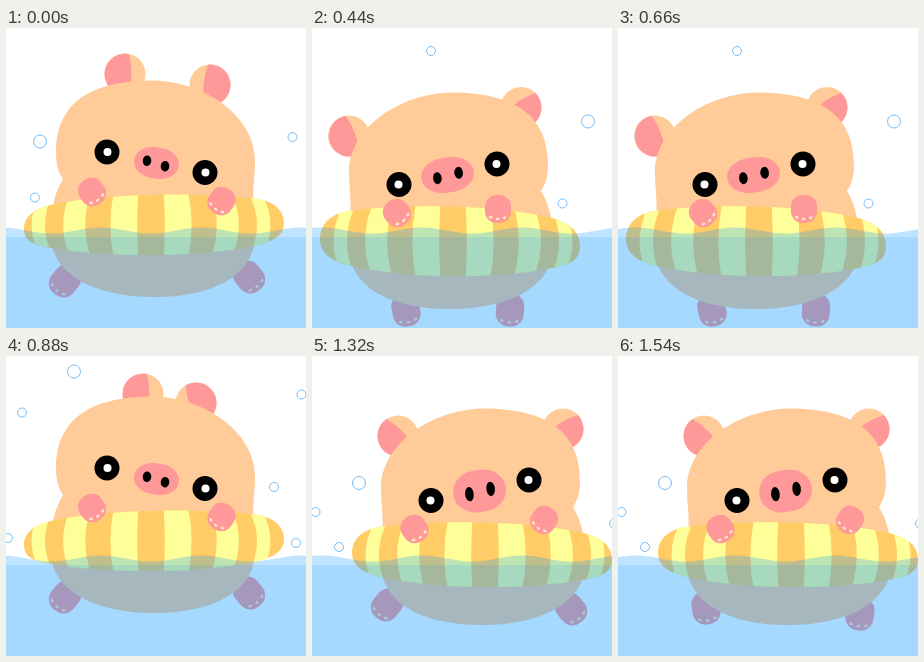
An HTML page with a canvas for the animation above (1.76 s loop, 300 px wide and 300 px high).

```html
<!DOCTYPE html>
<html lang="en">
<head>
<meta charset="utf-8">
<title>Floating pig</title>
<style>
html, body { margin: 0; width: 100%; height: 100%; overflow: hidden; background: #fff; }
canvas { display: block; width: 300px; height: 300px; }
</style>
</head>
<body>
<canvas id="stage" width="300" height="300"></canvas>
<script>
const ctx = document.getElementById('stage').getContext('2d');
const LOOP = 1760, SURFACE = 209;
const PEACH = '#ffcc99', PINK = '#ff9999', ORANGE = '#ffcc66', YELLOW = '#ffff99';

const BODY = new Path2D('M50 125C50 80 77 52.5 148 52.5C205 55 249 92 249 132C249 150 246 160 248 185' +
  'C261 246 209 269 148 269C89 269 39 246 45 198C45 179 50 162 57 151C52 144 50 135 50 125Z');
const RING = new Path2D('M18 201C18 186 32 178 60 174C110 165 200 164 252 171C270 174 278 184 278 195' +
  'C278 207 268 213 252 217C200 229 110 231 45 220C27 217 18 213 18 201Z');

// Limbs come in pairs: lean lowers one side, tilt opens both, turn rotates both
const FEET = {
  wide: { xs: [59, 243], y: 251, lean: -2, tilt: 40 },
  down: { xs: [76, 230], y: 255, lean: -3, tilt: -8 },
  low: { xs: [88, 192], y: 270, lean: 0, tilt: -8, turn: 4 }
};
const HANDS = {
  apart: { xs: [86, 215.5], y: 168.5, lean: 4.5, tilt: -35 },
  close: { xs: [100, 201], y: 171, lean: 2, tilt: -22, turn: 20 }
};

// Ears: x, y, degrees towards the pink side. The first bubble is the large one.
const UPRIGHT = { flip: 0, dy: 0, ring: 60, nose: [45, 31], hands: 'apart' };
const POSES = {
  a: { ...UPRIGHT, ears: [[119, 46, 180], [204, 57, 6]],
    bubbles: [[34, 113.5], [29, 169.5], [286.5, 109]] },
  b: { flip: 286, dy: 12, ring: 69, nose: [53, 35], hands: 'close',
    ears: [[77, 67.5, 125], [249, 96, 20]],
    bubbles: [[276, 93.5], [119, 23], [250.5, 175.5]] },
  c: { ...UPRIGHT, dy: -12, ears: [[137, 50, 180], [190, 59, -20]],
    bubbles: [[68, 15.5], [16, 56.5], [295.5, 38.5], [268, 131], [2, 182], [290, 187]] },
  d: { ...UPRIGHT, flip: 318, ring: 64, nose: [53, 42], ears: [[67, 73, 122], [232, 80, 45]],
    bubbles: [[47, 127], [3.5, 156], [27, 191], [302, 167.5]] }
};

const STEPS = [
  { at: 0, pose: 'a', feet: 'wide' },
  { at: 220, pose: 'a', feet: 'wide' },
  { at: 440, pose: 'b', feet: 'low' },
  { at: 550, pose: 'b', feet: 'low' },
  { at: 660, pose: 'b', feet: 'low' },
  { at: 880, pose: 'c', feet: 'wide' },
  { at: 1100, pose: 'c', feet: 'down' },
  { at: 1320, pose: 'd', feet: 'wide' },
  { at: 1430, pose: 'd', feet: 'wide' },
  { at: 1540, pose: 'd', feet: 'down' }
];

const rad = deg => deg * Math.PI / 180;

function oval(x, y, rx, ry, color, deg = 0) {
  ctx.fillStyle = color;
  ctx.beginPath();
  ctx.ellipse(x, y, rx, ry, rad(deg), 0, Math.PI * 2);
  ctx.fill();
}

function placed(x, y, deg, draw) {
  ctx.save();
  ctx.translate(x, y);
  ctx.rotate(rad(deg));
  draw();
  ctx.restore();
}

function rounded(w, h, rx, ry) {
  ctx.fillStyle = PINK;
  ctx.beginPath();
  ctx.roundRect(-w / 2, -h / 2, w, h, { x: rx, y: ry });
  ctx.fill();
}

function limbs({ xs, y, lean, tilt, turn = 0 }, w, h) {
  [-1, 1].forEach((side, i) => placed(xs[i], y + side * lean, turn - side * tilt, () => {
    rounded(w, h, w * 0.45, w * 0.45);
    for (const toe of [-1, 0, 1]) {
      oval(toe * w * 0.27, h / 2 - 4 - Math.abs(toe) * 1.5, 2, 1.3, '#ffe6c4', toe * -20);
    }
  }));
}

function ear([x, y, deg]) {
  const r = 20.5, edge = -4;
  oval(x, y, r, r, PEACH);
  placed(x, y, deg, () => {
    const a = Math.acos(edge / r);
    ctx.fillStyle = PINK;
    ctx.beginPath();
    ctx.arc(0, 0, r, -a, a);
    ctx.quadraticCurveTo(edge - 5, 0, edge, -r * Math.sin(a));
    ctx.fill();
  });
}

function face([w, h]) {
  for (const [x, y] of [[101, 124], [199, 144.5]]) {
    oval(x, y, 12.5, 12.5, '#000');
    oval(x + 0.5, y, 4, 4, '#fff');
  }
  placed(150.5, 135, 8, () => rounded(w, h, w * 0.44, h * 0.49));
  for (const side of [-1, 1]) {
    oval(150 + side * w * 0.2, 135.5 + side * 2.7, 4.3, h * 0.17, '#000', 6);
  }
}

// Stripes are evenly spaced around the ring, so they narrow towards its ends
const stripeX = k => 145 + 130 * Math.sin(k * 0.212);

function ring(height) {
  ctx.save();
  ctx.translate(0, 167);
  ctx.scale(1, height / 60);
  ctx.translate(0, -167);
  ctx.clip(RING);
  ctx.fillStyle = ORANGE;
  ctx.fillRect(10, 155, 280, 85);
  ctx.fillStyle = YELLOW;
  for (let k = -5.5; k < 5; k += 2) {
    const l = stripeX(k), r = stripeX(k + 1);
    const bl = (l - 145) * 0.11, br = (r - 145) * 0.11;
    ctx.beginPath();
    ctx.moveTo(l - bl, 160);
    ctx.quadraticCurveTo(l + bl, 197, l - bl, 234);
    ctx.lineTo(r - br, 234);
    ctx.quadraticCurveTo(r + br, 197, r - br, 160);
    ctx.fill();
  }
  ctx.restore();
}

function pig(pose, feet) {
  ctx.save();
  if (pose.flip) ctx.transform(-1, 0, 0, 1, pose.flip, 0);
  ctx.translate(0, pose.dy);
  limbs(FEET[feet], 28, 33);
  pose.ears.forEach(ear);
  ctx.fillStyle = PEACH;
  ctx.fill(BODY);
  face(pose.nose);
  ring(pose.ring);
  limbs(HANDS[pose.hands], 26, 28);
  ctx.restore();
}

function water(time) {
  const crest = time / 880 % 1 * 30 - 5;
  ctx.fillStyle = 'rgba(0,146,255,.25)';
  ctx.beginPath();
  ctx.moveTo(0, SURFACE);
  for (let x = 0; x <= 300; x += 3) {
    ctx.lineTo(x, 202.5 - 3 * Math.cos((x - crest) / 100 * Math.PI * 2));
  }
  ctx.lineTo(300, SURFACE);
  ctx.fill();
  ctx.fillStyle = 'rgba(0,146,255,.35)';
  ctx.fillRect(0, SURFACE, 300, 300 - SURFACE);
}

function bubble([x, y], i) {
  ctx.strokeStyle = '#73bdfa';
  ctx.lineWidth = 1;
  ctx.beginPath();
  ctx.arc(x, y, i ? 4.5 : 6.5, 0, Math.PI * 2);
  ctx.stroke();
}

let shown;
function render(time) {
  const step = STEPS.findLast(s => s.at <= time);
  if (step === shown) return;
  shown = step;
  const pose = POSES[step.pose];
  ctx.fillStyle = '#fff';
  ctx.fillRect(0, 0, 300, 300);
  pig(pose, step.feet);
  water(step.at);
  pose.bubbles.forEach(bubble);
}

const start = performance.now();
function tick() {
  render((performance.now() - start) % LOOP);
  requestAnimationFrame(tick);
}
tick();
</script>
</body>
</html>
```
